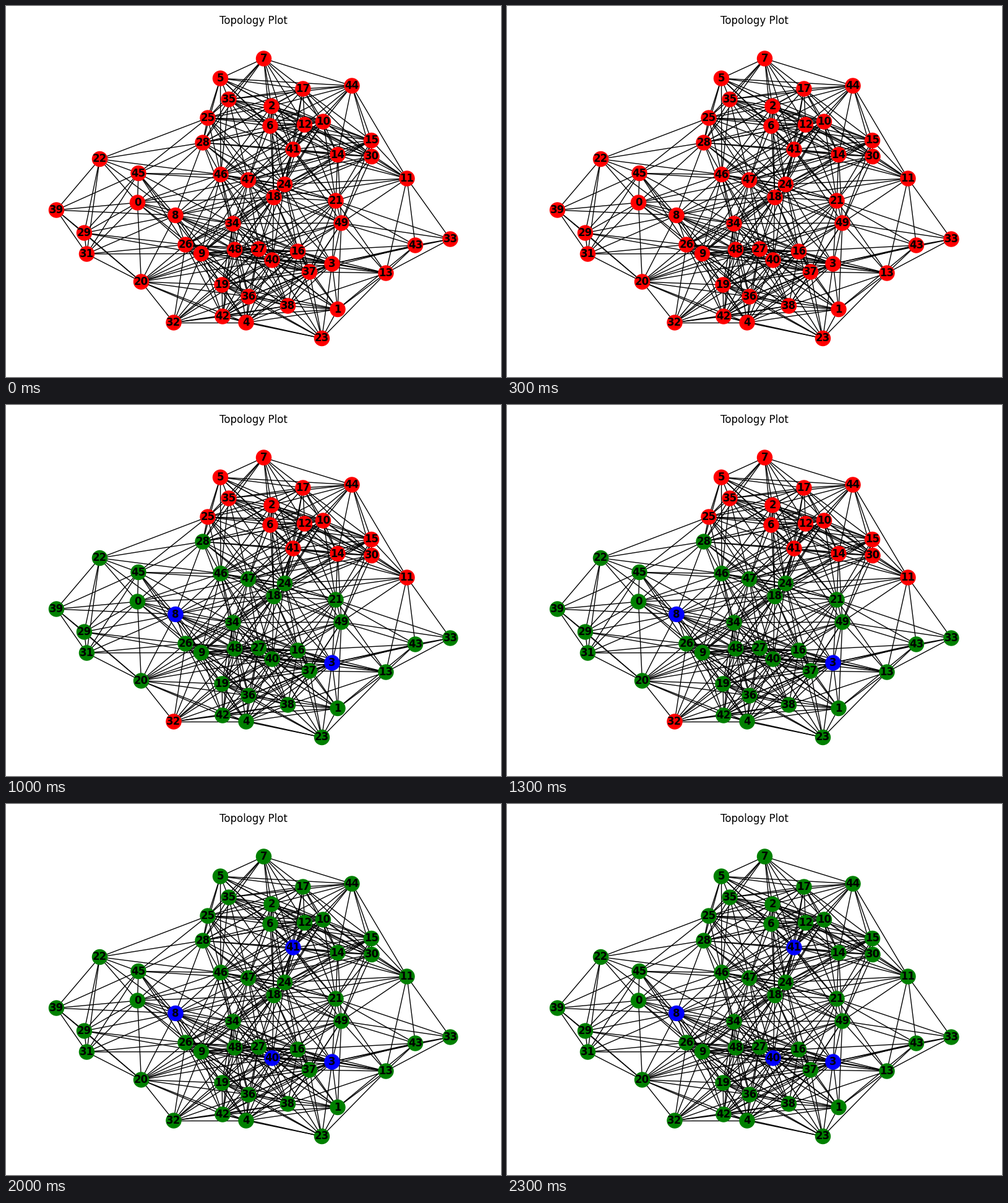
Write a matplotlib script that moves like this. It is 800 px wide and 600 px high and loops after 2.5 s.

```python
import itertools

import matplotlib.pyplot as plt
import numpy as np
from matplotlib.animation import FuncAnimation
from matplotlib.collections import LineCollection

W, H, DPI = 800, 600, 100

# Node centres in pixels from the top left, indexed by node id.
NODES = np.array([
    (212.5, 318), (536, 490.5), (429, 162), (527, 417), (388, 512),
    (346.5, 117), (427, 194), (416.5, 85), (274, 338.5), (315.5, 400.5),
    (512.5, 187), (648, 279), (482.5, 192), (614, 432), (536, 240.5),
    (590.5, 217.5), (471.5, 397), (480, 134), (433, 309.5), (349, 451),
    (218.5, 446), (533, 315), (151.5, 247.5), (510.5, 537.5), (450.5, 288.5),
    (326, 181), (290, 386), (408.5, 393), (318, 221), (126.5, 367),
    (591, 243.5), (130.5, 401), (271, 512), (718, 377), (367, 352),
    (360, 151), (392, 470), (490.5, 430), (455.5, 485), (81.5, 330),
    (430, 411), (464, 232), (350, 502), (661.5, 387), (559, 129),
    (214, 270.5), (347, 272.5), (391.5, 281.5), (369.5, 394), (542, 351),
])

# Nodes within radio range are linked; range is measured in layout units,
# where x is stretched on screen.
STRETCH, RANGE = 1.4, 158.5
EXTRA = {(11, 44)}
BLOCKED = {(31, 32), (30, 43)}
HEADS = [3, 8, 40, 41]


def linked(i, j):
    dx, dy = NODES[i] - NODES[j]
    return np.hypot(dx / STRETCH, dy) < RANGE


pairs = itertools.combinations(range(len(NODES)), 2)
edges = {p for p in pairs if linked(*p)} - BLOCKED | EXTRA


def node_colors(step):
    """Heads are blue, their neighbours green, uncovered nodes red."""
    heads = set(HEADS[:step])
    covered = {n for e in edges if heads & set(e) for n in e}
    return ["blue" if n in heads else "green" if n in covered else "red"
            for n in range(len(NODES))]


fig = plt.figure(figsize=(W / DPI, H / DPI), dpi=DPI, facecolor="white")
ax = fig.add_axes([0, 0, 1, 1])
ax.set_xlim(0, W)
ax.set_ylim(H, 0)
ax.axis("off")

ax.add_collection(LineCollection(
    [NODES[list(e)] for e in sorted(edges)],
    colors="black", linewidths=1, zorder=1))
dots = ax.scatter(*NODES.T, s=300, c=node_colors(0), zorder=2)
for n, (x, y) in enumerate(NODES):
    ax.text(x, y, str(n), fontsize=12, weight="bold", family="DejaVu Sans",
            ha="center", va="center", zorder=3)
ax.text(W / 2, 29, "Topology Plot", fontsize=12, family="DejaVu Sans",
        ha="center", va="baseline")


def update(step):
    dots.set_color(node_colors(step))
    return [dots]


anim = FuncAnimation(fig, update, frames=len(HEADS) + 1, interval=500,
                     repeat=True, repeat_delay=0)
plt.show()
```
